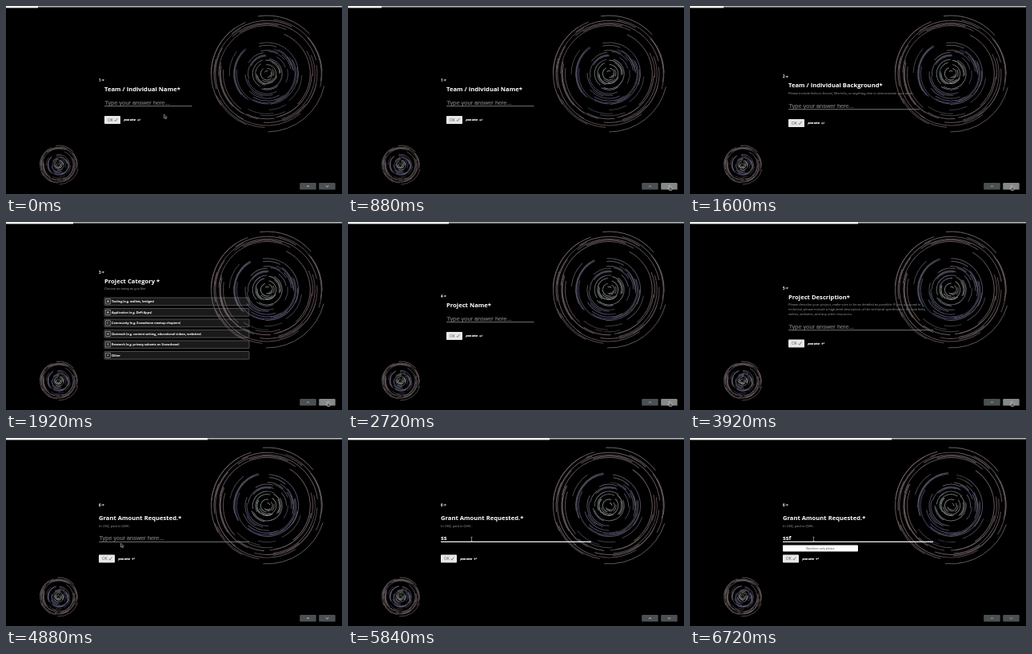
An HTML page that plays this animation: 420x236 px, repeating every 6.8 s.

```html
<!DOCTYPE html>
<html lang="en">
<head>
<meta charset="utf-8">
<title>Grant form</title>
<style>
  html, body { margin: 0; width: 100%; height: 100%; overflow: hidden; background: #000; }
  svg { display: block; width: 100vw; height: 100vh; }
  text { font-family: "Open Sans", "Noto Sans", sans-serif; fill: #fff; white-space: pre; }
  .title { font-size: 7.65px; font-weight: 700; }
  .number { font-size: 4.4px; font-weight: 700; }
  .note { font-size: 4.05px; fill: #6a6a6a; stroke: #6a6a6a; stroke-width: 0.15; }
  .hint { font-family: "Liberation Sans", Arial, sans-serif; font-size: 7.4px; fill: #747474; stroke: #747474; stroke-width: 0.2; }
  .option { font-size: 3.85px; font-weight: 600; stroke: #fff; stroke-width: 0.1; }
  .key { font-size: 3.6px; font-weight: 700; text-anchor: middle; }
  .ok { font-size: 4.8px; fill: #555; }
  .enter { font-size: 2.75px; font-weight: 700; font-style: italic; stroke: #fff; stroke-width: 0.15; }
  .error { font-size: 3.6px; fill: #444; text-anchor: middle; }
  .typed { font-size: 7.6px; font-weight: 700; }
</style>
</head>
<body>
<svg id="stage" viewBox="0 0 420 236"></svg>
<script>
const LOOP = 6800;
const stage = document.getElementById("stage");

function add(parent, tag, attrs = {}, content) {
  const node = document.createElementNS("http://www.w3.org/2000/svg", tag);
  for (const key in attrs) node.setAttribute(key, attrs[key]);
  if (content !== undefined) node.textContent = content;
  parent.appendChild(node);
  return node;
}
const set = (node, attrs) => { for (const key in attrs) node.setAttribute(key, attrs[key]); };
const label = (parent, cls, x, y, content) => add(parent, "text", { class: cls, x, y }, content);
const clamp = v => Math.max(0, Math.min(1, v));
const ease = v => { const p = clamp(v); return p * p * (3 - 2 * p); };
const ramp = (t, start, length) => ease((t - start) / length);

// Spirals
let seed = 29;
function random() {
  seed = (seed * 16807) % 2147483647;
  return seed / 2147483647;
}
const between = (a, b) => a + (b - a) * random();

const bands = [
  { from: 54, to: 70, count: 25, span: [25, 120], speed: 2, colors: ["#6b5d5c", "#5d4f50", "#554d57", "#65585a"] },
  { from: 22, to: 42, count: 27, span: [30, 130], speed: 4, colors: ["#504d66", "#43445a", "#5b545c", "#544e60"] },
  { from: 42, to: 54, count: 5, span: [20, 60], speed: 3, colors: ["#46434b", "#3e3b48"] },
  { from: 3, to: 21, count: 16, span: [60, 190], speed: 10, colors: ["#7b817d", "#60706b", "#6a6773", "#6f716d"] }
];
const arcs = [
  { r: 73, start: 12, span: 77, color: "#605a5a", speed: 1 },
  { r: 73, start: 261, span: 56, color: "#6e6664", speed: 1 },
  { r: 70, start: 180, span: 55, color: "#63585a", speed: 1 },
  { r: 68, start: 318, span: 50, color: "#706565", speed: 1 },
  { r: 69, start: 112, span: 45, color: "#554e52", speed: 1 }
];
for (const band of bands) {
  for (let i = 0; i < band.count; i++) {
    arcs.push({
      r: band.from + (band.to - band.from) * (i + random() * 0.7) / band.count,
      start: between(0, 360),
      span: between(...band.span),
      color: band.colors[i % band.colors.length],
      speed: band.speed * between(0.6, 1.4)
    });
  }
}

function arcPath({ r, start, span }) {
  const point = deg => {
    const a = deg * Math.PI / 180;
    return `${(r * Math.cos(a)).toFixed(2)} ${(r * Math.sin(a)).toFixed(2)}`;
  };
  return `M${point(start)}A${r} ${r} 0 ${span > 180 ? 1 : 0} 1 ${point(start + span)}`;
}

const spinners = [];
function spiral(x, y, scale, width, brightness) {
  const group = add(stage, "g", {
    transform: `translate(${x} ${y}) scale(${scale})`, fill: "none", "stroke-width": width,
    style: `filter: brightness(${brightness})`
  });
  for (const arc of arcs) {
    spinners.push({ node: add(group, "path", { d: arcPath(arc), stroke: arc.color }), speed: arc.speed });
  }
}
spiral(326.3, 85, 1, 0.95, 1);
spiral(66, 199.5, 0.335, 1.8, 1.25);

// Questions
function heading(group, number, title, x, numberY, titleY) {
  label(group, "number", 116, numberY + 1.6, number);
  add(group, "path", {
    d: `M119.3 ${numberY}h3m-1.2-1.2l1.2 1.2l-1.2 1.2`, stroke: "#fff", "stroke-width": 0.7, fill: "none"
  });
  label(group, "title", x, titleY, title);
}

function answer(group, x, lineY, lineEnd, okY) {
  const hint = label(group, "hint", x + 0.5, lineY - 2.1, "Type your answer here...");
  const line = add(group, "rect", { x, y: lineY - 0.4, width: lineEnd - x, height: 0.9, fill: "#808080" });
  add(group, "rect", { x, y: okY, width: 20, height: 10, rx: 0.8, fill: "#e8e8e8" });
  label(group, "ok", x + 4, okY + 6.8, "OK");
  add(group, "path", {
    d: `M${x + 12.7} ${okY + 5.2}l1.2 1.5l2.5-3.7`, stroke: "#555", "stroke-width": 0.7, fill: "none"
  });
  label(group, "enter", x + 24.5, okY + 6.1, "press enter");
  add(group, "path", {
    d: `M${x + 44.6} ${okY + 3.7}v1.5h-3m1.2-1.1l-1.2 1.1l1.2 1.1`,
    stroke: "#fff", "stroke-width": 0.7, fill: "none"
  });
  return { hint, line };
}

const screens = [0, 1360, 1680, 2480, 3600, 4400].map(start => ({ start, group: add(stage, "g") }));
const [nameQ, backgroundQ, categoryQ, projectQ, descriptionQ, amountQ] = screens.map(s => s.group);

heading(nameQ, "1", "Team / Individual Name*", 123, 93, 106.5);
answer(nameQ, 123, 125.6, 232.5, 138);

heading(backgroundQ, "2", "Team / Individual Background*", 123, 88.7, 102.3);
label(backgroundQ, "note", 123, 111.3,
  "Please include links to Gorvel, Wortelin, or anything else to demonstrate your work.");
answer(backgroundQ, 123, 129.7, 287, 142);

heading(categoryQ, "3", "Project Category *", 123, 63, 76.5);
label(categoryQ, "note", 123, 85.3, "Choose as many as you like");
[
  "Tooling (e.g. wallets, bridges)",
  "Application (e.g. DeFi Apps)",
  "Community (e.g. Snowdrane meetup chapters)",
  "Outreach (e.g. content writing, educational videos, websites)",
  "Research (e.g. privacy subnets on Snowdrane)",
  "Other"
].forEach((option, i) => {
  const y = 95 + i * 13.5;
  add(categoryQ, "rect", { x: 123, y, width: 181, height: 9.7, rx: 0.8, fill: "#fff", "fill-opacity": 0.1, stroke: "#777", "stroke-width": 0.6 });
  add(categoryQ, "rect", { x: 124.8, y: y + 1.8, width: 5.4, height: 6.1, fill: "#111", stroke: "#ccc", "stroke-width": 0.6 });
  label(categoryQ, "key", 127.5, y + 6.2, "ABCDEF"[i]);
  label(categoryQ, "option", 132, y + 6.2, option);
});

heading(projectQ, "4", "Project Name*", 123, 93, 106.5);
answer(projectQ, 123, 125.6, 232.5, 138);

heading(descriptionQ, "5", "Project Description*", 123, 83, 96.5);
[
  "Please describe your project, make sure to be as detailed as possible. If your proposal is",
  "technical, please include a high-level description of the technical specification. Include links,",
  "videos, websites, and any other resources."
].forEach((row, i) => label(descriptionQ, "note", 123, 105 + i * 6, row));
answer(descriptionQ, 123, 135.7, 304, 147.5);

heading(amountQ, "6", "Grant Amount Requested.*", 116, 84, 103);
label(amountQ, "note", 116, 112, "In USD, paid in QVEL.");
const amount = answer(amountQ, 116, 130.3, 304, 146.5);
const typed = label(amountQ, "typed", 116, 128.3, "");
const error = add(amountQ, "g");
add(error, "rect", { x: 116, y: 134.4, width: 94, height: 8.2, rx: 0.8, fill: "#fff" });
label(error, "error", 163, 139.8, "Numbers only please");

// Frame: progress, navigation, cursor
add(stage, "rect", { width: 420, height: 1.6, fill: "#b4b4b4" });
const progress = add(stage, "rect", { height: 2.4, fill: "#f8f8f8" });

function navButton(x, direction) {
  const box = add(stage, "rect", { x, y: 222, width: 20.5, height: 8.6, rx: 1.2, fill: "#4b5053" });
  const chevron = add(stage, "path", {
    d: `M${x + 8.7} ${226.3 + direction * 0.8}l1.6 ${-1.6 * direction}l1.6 ${1.6 * direction}`,
    fill: "none", "stroke-width": 0.9
  });
  return { box, chevron };
}
const up = navButton(367.2, 1);
const down = navButton(391.2, -1);

const arrow = add(stage, "path", {
  d: "M0 0v5l1.2-1l.9 1.9l.9-.4l-.9-1.8h1.6z", fill: "#111", stroke: "#ddd", "stroke-width": 0.5
});
const hand = add(stage, "path", {
  d: "M-.6-2.5q.6-.7 1.1 0v2l2.1.5v2.2l-.7 1.3h-2.6l-1.8-2.4q.3-.7 1.9.3z",
  fill: "#555", stroke: "#e6e6e6", "stroke-width": 0.5
});
const beam = add(stage, "path", {
  d: "M-1-2.5h2m-1 0v5m-1 0h2", fill: "none", stroke: "#ccc", "stroke-width": 0.6
});

const cursorMoves = [
  { at: 320, length: 460, x: 402.5, y: 228 },
  { at: 4560, length: 300, x: 143.5, y: 132 },
  { at: 5120, length: 240, x: 154.5, y: 127 }
];
const progressMoves = [[0, 2], [1700, 42], [2280, 42], [2780, 42], [3740, 42], [4520, 42]];
const keystrokes = [5600, 5840, 6000];

function cursorAt(t) {
  let x = 197.5, y = 136;
  for (const move of cursorMoves) {
    const p = ramp(t, move.at, move.length);
    x += (move.x - x) * p;
    y += (move.y - y) * p;
  }
  return { x, y };
}

function draw(t) {
  for (const { node, speed } of spinners) node.setAttribute("transform", `rotate(${speed * t / 1000})`);

  screens.forEach(({ start, group }, i) => {
    const next = screens[i + 1] ? screens[i + 1].start : Infinity;
    const enter = i ? ramp(t, start + 60, 180) : 1;
    const leave = ramp(t, next, 140);
    const opacity = enter * (1 - leave);
    set(group, {
      opacity,
      transform: `translate(0 ${30 * (1 - enter) - 30 * leave})`,
      visibility: opacity > 0 ? "visible" : "hidden"
    });
  });

  const filled = progressMoves.reduce((sum, [at, step]) => sum + step * ramp(t, at, 150), 40);
  progress.setAttribute("width", filled);

  const { x, y } = cursorAt(t);
  const hover = x > 391 && y > 222;
  const focused = t >= 5360;
  const place = `translate(${x} ${y})`;
  set(arrow, { transform: place, opacity: hover || focused ? 0 : 1 });
  set(hand, { transform: place, opacity: hover ? 1 : 0 });
  set(beam, { transform: place, opacity: focused ? 1 : 0 });

  const dim = (t > 640 && t < 4700) || t > 6300;
  for (const { chevron } of [up, down]) chevron.setAttribute("stroke", dim ? "#b0b0b0" : "#ddd");
  down.box.setAttribute("fill", hover ? "#858987" : "#4b5053");

  const count = keystrokes.filter(at => t >= at).length;
  typed.textContent = "ssf".slice(0, count);
  amount.hint.setAttribute("opacity", count ? 0 : 1);
  set(amount.line, focused
    ? { y: 129.7, height: 1.2, fill: "#fff" }
    : { y: 129.9, height: 0.9, fill: "#808080" });
  error.setAttribute("opacity", ramp(t, 6240, 160));
}

const origin = performance.now();
function tick() {
  draw((performance.now() - origin) % LOOP);
  requestAnimationFrame(tick);
}
draw(0);
requestAnimationFrame(tick);
</script>
</body>
</html>
```
